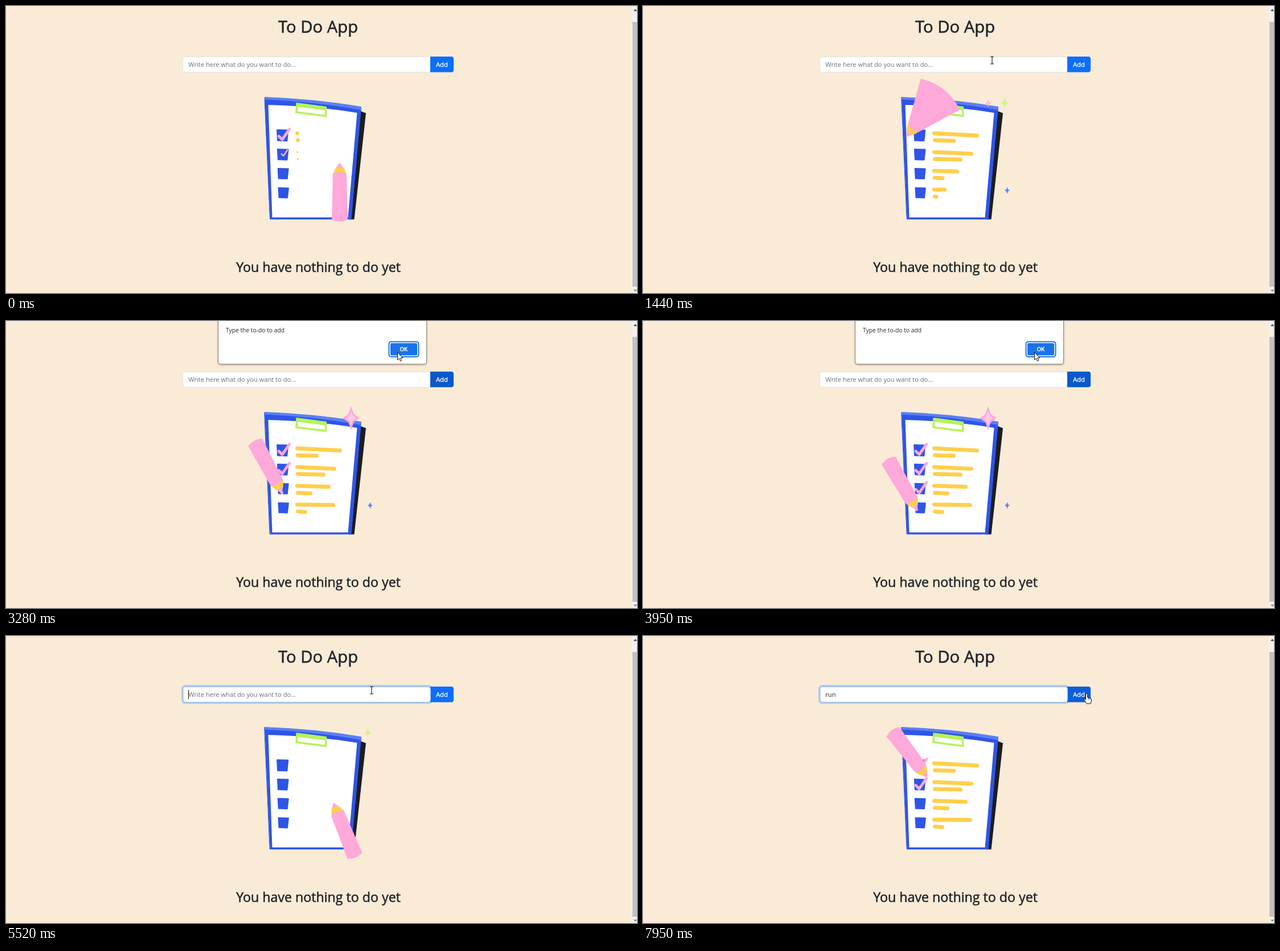
An HTML page with a canvas for the animation above (8000 ms loop, 1108 px wide and 505 px high).

```html
<!DOCTYPE html>
<html lang="en">
<head>
<meta charset="utf-8">
<title>To Do App</title>
<style>
html, body { margin: 0; width: 100%; height: 100%; overflow: hidden; background: #faebd7; }
canvas { display: block; }
</style>
</head>
<body>
<canvas width="1108" height="505"></canvas>
<script>
const ctx = document.querySelector('canvas').getContext('2d');
const LOOP = 8000, CYCLE = 5160;
const PINK = '#ffa8da', YELLOW = '#ffcf4d', BLUE = '#2f55e7', SKY = '#5b80f5', LIME = '#b4f35b';
const INK = '#212529', FONT = '"Open Sans", "Noto Sans", sans-serif';
const ROWS = [0, 1, 2, 3];

const clamp = v => Math.max(0, Math.min(1, v));
// Progress from 0 to 1 over a span of time
const ramp = (t, start, length) => clamp((t - start) / length);
const ease = v => v * v * (3 - 2 * v);
const mix = (a, b, k) => a + (b - a) * k;
const rowY = i => 228 + 33.7 * i;

function shape(path, fill, stroke, width = 1) {
  const p = new Path2D(path);
  if (fill) { ctx.fillStyle = fill; ctx.fill(p); }
  if (stroke) { ctx.strokeStyle = stroke; ctx.lineWidth = width; ctx.stroke(p); }
}

function box(x, y, w, h, r, fill, stroke, width = 1) {
  ctx.beginPath();
  ctx.roundRect(x, y, w, h, r);
  if (fill) { ctx.fillStyle = fill; ctx.fill(); }
  if (stroke) { ctx.strokeStyle = stroke; ctx.lineWidth = width; ctx.stroke(); }
}

// A thin outline gives the medium weight
function text(str, x, y, size, { color = INK, outline = 0, align = 'left' } = {}) {
  ctx.font = `${size}px ${FONT}`;
  ctx.textAlign = align;
  ctx.fillStyle = ctx.strokeStyle = color;
  ctx.fillText(str, x, y);
  if (outline) { ctx.lineWidth = outline; ctx.strokeText(str, x, y); }
}

function drawPage(t, pointer) {
  ctx.lineJoin = 'round';
  ctx.fillStyle = '#faebd7';
  ctx.fillRect(0, 0, 1108, 505);
  text('To Do App', 548, 47, 29.2, { outline: .6, align: 'center' });
  text('You have nothing to do yet', 548.5, 468, 23.2, { outline: .55, align: 'center' });

  ctx.fillStyle = '#f1f1f1';
  ctx.fillRect(1099, 0, 9, 505);
  ctx.fillStyle = '#c1c1c1';
  ctx.fillRect(1100, 28, 8, 466);
  shape('M1102 9h6l-3-4z', '#505050');
  shape('M1102 499h6l-3 4z', '#8a8a8a');

  const focus = t >= 5040;
  const typed = 'run'.slice(0, clamp((t - 6300) / 900) * 3);
  const button = t > 2200 && t < 4300 ? '#0a58ca' : pointer === 'hand' ? '#0b5ed7' : '#0d6efd';
  box(310.5, 89.5, 435, 27, 4, '#fff', '#dee2e6');
  box(745, 89, 41, 27.5, [0, 4, 4, 0], button);
  if (focus) {
    box(309.5, 87.5, 437.5, 30.5, 5, null, 'rgba(13,110,253,.27)', 3);
    box(311, 89.5, 434.5, 27, 4, null, '#86b7fe');
  }
  text('Add', 765.5, 106.7, 11.4, { color: '#fff', outline: .3, align: 'center' });
  text(typed || 'Write here what do you want to do...', 320.3, 106.7, 11.15, { color: typed ? INK : '#6b6f73' });
  if (focus && (t - 5040) % 1060 < 530) {
    ctx.fillStyle = '#111';
    ctx.fillRect(320 + ctx.measureText(typed).width, 95, 1, 16);
  }
}

function drawBoard() {
  shape('M623 185L632 188.5L611.5 375.5H602Z', '#1d1d1f');
  shape('M454 161Q537 164 623.5 178L606 375H463.5Z', BLUE, BLUE);
  shape('M454 160Q540 163 624 177V183Q540 168 454 164.5Z', SKY);
  shape('M460.5 174Q545 176 616.5 188L600.5 372H467.5Z', '#fff');
  shape('M509.5 170L563 177L563.5 195.5L508 188.5Z', LIME);
  shape('M512.5 177.5L560 183.5V191.5L512 185.5Z', '#fff');
  for (const i of ROWS) {
    const x = 485.7 + .5 * i, y = rowY(i) - .3, r = 9.6 - .3 * i;
    shape(`M${x - r} ${y - r}L${x + r} ${y - r + .5}L${x + r - 2} ${y + r}L${x - r + 1} ${y + r - .5}Z`, BLUE, BLUE, 2);
  }
}

// Time of the cycle, negative until the erasing that runs past its end
const eraseTime = p => p < 1000 ? p : p - CYCLE;

function drawLine(x, y, length, tilt, grow, i, p) {
  const q = eraseTime(p);
  const k = grow * (1 - ramp(q, -200 - 60 * i, 200));
  const dot = Math.min(grow * 8, clamp(1 - .5 * i - q / 150));
  if (dot <= 0) return;
  ctx.lineCap = 'round';
  shape(`M${x} ${y}l${(length - 7) * k + .01} ${tilt * k}`, null, YELLOW, 7 * dot);
}

function drawLines(p) {
  const long = [82, 72, 62, 70], short = [40, 52, 29, 20];
  for (const i of ROWS) {
    const grow = delay => p < 1000 ? 1 : ramp(p, 1110 + 90 * i + delay, 210);
    const y = 224 + 33 * i;
    drawLine(511.5, y, long[i], 4 - 1.1 * i, grow(0), i, p);
    drawLine(512.5, y + 12.3, short[i], 1, grow(22), i, p);
  }
}

// Progress of the two strokes of a tick
function tickStrokes(i, p) {
  const start = 1500 + 800 * i;
  return p < 1000 ? [1, 1] : [ramp(p, start, 190), ramp(p, start + 190, 300)];
}

function drawTicks(p) {
  for (const i of ROWS) {
    const [down, up] = tickStrokes(i, p);
    const size = 1 - ramp(eraseTime(p), 10 - 100 * i, 200);
    if (!down || !size) continue;
    ctx.save();
    ctx.translate(489.5, rowY(i) - 4);
    ctx.scale(size, size);
    ctx.lineCap = 'round';
    shape(`M-10.5 5l${6 * down} ${6 * down}l${13 * up} ${-18.5 * up}`, null, PINK, 4.8);
    ctx.restore();
  }
}

function pencilPose(p) {
  // Waiting at the lower right
  const sway = p < 1500 ? ease(ramp(p, 0, 360)) : 0;
  const rest = { x: 586 - 11 * sway, y: 276 + 18 * sway, angle: 90 - 22 * sway };

  // Ticking, with a hop to the next row
  const i = Math.floor(clamp((p - 1500) / 3200) * 3.999);
  const [down, up] = p < 1500 ? [0, 0] : tickStrokes(i, p);
  const hop = i < 3 ? ease(ramp(p, 1990 + 800 * i, 310)) : 0;
  const tick = {
    x: 480 + 5 * down + 14 * up - 19 * hop,
    y: rowY(i) + 1.5 + 5 * down - 20 * up + 47 * hop,
    angle: -121 + 3 * down - 9 * up + 6 * hop
  };

  // Swinging between the two, smeared wide at speed
  const swing = ease(ramp(p, 1335, 180)) - ease(ramp(p, 4450, 550));
  const arc = Math.max(0, Math.sin(Math.PI * swing));
  return {
    x: mix(rest.x, tick.x, swing + .6 * arc),
    y: mix(rest.y, tick.y, Math.min(1, swing + .6 * arc)),
    angle: mix(rest.angle, tick.angle, swing),
    width: 28 + 64 * Math.sqrt(arc)
  };
}

function drawPencil(p) {
  const { x, y, angle, width } = pencilPose(p);
  const len = 100 + .06 * width, a = width / 2 / len;
  const ex = len * Math.cos(a) - 2, ey = len * Math.sin(a) - 2;
  ctx.save();
  ctx.translate(x, y);
  ctx.rotate(angle * Math.PI / 180);
  shape('M1 0L10 -6V6Z', PINK, PINK, 2);
  shape('M7 -5.5Q13 -10 19 -11.5L21 0L19 11.5Q13 10 7 5.5Q9 0 7 -5.5Z', YELLOW);
  shape(`M20 -10Q17 0 20 10L${ex} ${ey}Q${len + width * .08} 0 ${ex} ${-ey}Z`, PINK, PINK, 4);
  ctx.restore();
}

function drawSparkle(t, x, y, radius, color, start, end, core) {
  const h = radius * ramp(t, start, 400) * ramp(-t, -end, 400), w = h * .7;
  if (!h) return;
  const star = (k, fill) => {
    const a = w * k, b = h * k, u = a * .33, v = b * .33;
    shape(`M${x} ${y - b}L${x + u} ${y - v}L${x + a} ${y}L${x + u} ${y + v}L${x} ${y + b}` +
      `L${x - u} ${y + v}L${x - a} ${y}L${x - u} ${y - v}Z`, fill);
  };
  star(1, color);
  if (core) star(.6, core);
}

function drawSparkles(t) {
  drawSparkle(t, 606, 171, 21, PINK, 1310, 5200, '#ffc9e8');
  drawSparkle(t, 635, 170, 9, '#cdf58a', 1000, 2000);
  drawSparkle(t, 635, 170, 9, '#cdf58a', 5200, 8000);
  drawSparkle(t, 639.5, 324.5, 6, SKY, 900, 5200);
  drawSparkle(t, 639.5, 324.5, 6, SKY, 6480, 7800);
}

function drawDialog() {
  ctx.save();
  ctx.shadowColor = 'rgba(0,0,0,.4)';
  ctx.shadowBlur = 4;
  ctx.shadowOffsetY = 1;
  box(373, -20, 365, 95.5, 4, '#fff');
  ctx.restore();
  box(372.5, -20, 366, 96, 4, null, 'rgba(0,0,0,.35)');
  text('Type the to-do to add', 386, 19.5, 10.3);
  box(672.5, 36.5, 52, 26.5, 4, '#fff', '#1a73e8', 2);
  box(675, 39, 47, 21.5, 2, '#1a73e8');
  text('OK', 698.3, 53, 9.6, { color: '#fff', outline: .6, align: 'center' });
}

// Pointer stops: arrival, departure, x, y
const stops = [
  [70, 70, 1046, 472], [830, 830, 733, 3], [1400, 1460, 613, 95], [1850, 2540, 768, 100],
  [3150, 4180, 687.5, 55], [4420, 4500, 650.5, 75], [4900, 7550, 642, 95], [7850, 8000, 779, 101]
];

function pointerAt(t) {
  const n = Math.max(0, stops.findLastIndex(s => s[0] <= t));
  const [, leave, x, y] = stops[n];
  const [arrive, , nx, ny] = stops[n + 1] || stops[n];
  const k = t > leave ? ease(ramp(t, leave, arrive - leave)) : 0;
  return [mix(x, nx, k), mix(y, ny, k)];
}

function pointerKind(x, y, dialog) {
  if (dialog || y < 89 || y > 117 || x < 311 || x > 786) return 'arrow';
  return x < 745 ? 'beam' : 'hand';
}

function drawPointer(kind, x, y) {
  ctx.save();
  ctx.translate(x, y);
  ctx.lineCap = 'butt';
  if (kind === 'beam') {
    shape('M-3 -6H-1L0 -5L1 -6H3M0 -5V6M-3 7H-1L0 6L1 7H3', null, '#222', 1.2);
  } else if (kind === 'hand') {
    shape('M-1.5 1Q0 -1 1.5 1V7L7 8.5Q9 9 8.5 12L7 18H0L-4 12Q-5.5 9.5 -4 9L-1.5 11Z', '#fff', '#111');
    shape('M3.5 8V11M6 8.5V11', null, '#111', .8);
  } else {
    shape('M0 0V13.5L3 10.8L5 15.5L7.2 14.5L5.2 10H9.3Z', '#fff', '#111');
  }
  ctx.restore();
}

function frame(now) {
  const t = now % LOOP, p = t % CYCLE;
  const dialog = t >= 2300 && t < 4300;
  const [x, y] = pointerAt(t);
  const kind = pointerKind(x, y, dialog);
  drawPage(t, kind);
  drawBoard();
  drawLines(p);
  drawTicks(p);
  drawSparkles(t);
  drawPencil(p);
  if (dialog) drawDialog();
  if (t >= 70) drawPointer(kind, x, y);
  requestAnimationFrame(frame);
}
requestAnimationFrame(frame);
</script>
</body>
</html>
```
